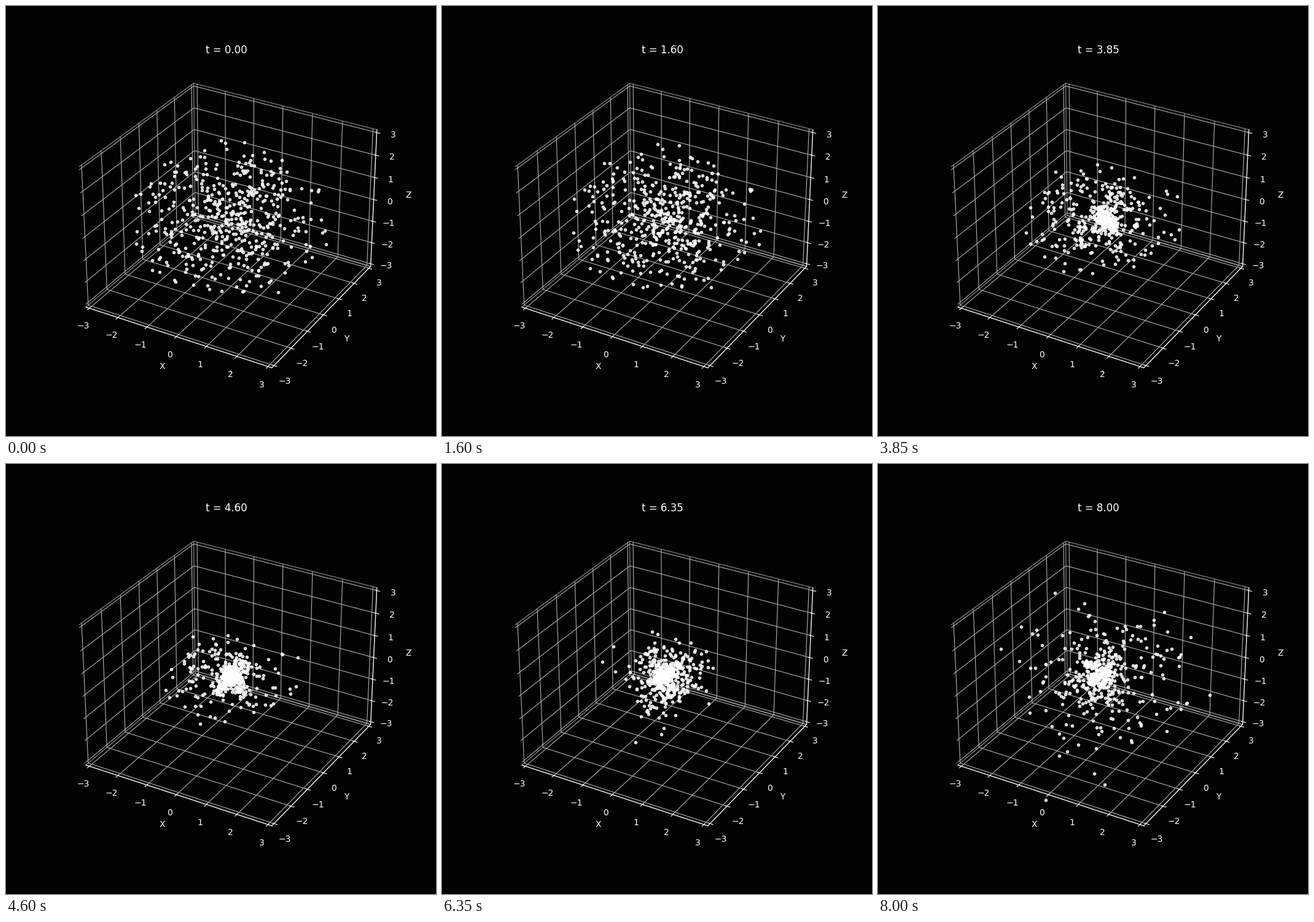
Write a matplotlib script that moves like this. It is 700x700 px and loops after 8.05 s.

```python
import numpy as np
import matplotlib.pyplot as plt
from matplotlib.animation import FuncAnimation

N = 500
FRAMES = 161
DT = 0.05
SOFT = 0.01
RADIUS = 2.95
LIM = 3.125  # +-3 plus the padding around the cube
BACK = "#030303"


def accel(pos):
    """Softened gravity of N equal masses with G = M = 1."""
    d = [p[None, :] - p[:, None] for p in pos]
    r2 = d[0] ** 2 + d[1] ** 2 + d[2] ** 2 + SOFT ** 2
    w = 1.0 / (N * r2 * np.sqrt(r2))
    return np.array([(w * c).sum(axis=1) for c in d])


def ball(rng):
    """Random points in a ball, slightly denser towards the middle."""
    v = rng.normal(size=(3, N))
    return v / np.linalg.norm(v, axis=0) * RADIUS * rng.uniform(size=N) ** 0.55


def simulate(seed=42):
    rng = np.random.default_rng(seed)
    pos = ball(rng)
    vel = rng.normal(0, 0.05, (3, N))
    acc = accel(pos)
    track = [pos]
    for _ in range(FRAMES - 1):
        vel = vel + 0.5 * DT * acc
        pos = pos + DT * vel
        acc = accel(pos)
        vel = vel + 0.5 * DT * acc
        track.append(pos)
    return track


track = simulate()

fig = plt.figure(figsize=(7, 7), dpi=100, facecolor=BACK)
ax = fig.add_subplot(111, projection="3d", facecolor=BACK)
ax.set(xlim=(-LIM, LIM), ylim=(-LIM, LIM), zlim=(-LIM, LIM))

for axis, name in zip((ax.xaxis, ax.yaxis, ax.zaxis), "XYZ"):
    axis.set_ticks(range(-3, 4))
    axis.set_label_text(name, color="white")
    axis.pane.fill = False
    axis.line.set_color("white")
    axis.set_tick_params(colors="white")

title = ax.set_title("t = 0.00", color="white", pad=5.3)
dots, = ax.plot(*track[0], "o", color="white", markersize=3, alpha=0.8)


def update(i):
    dots.set_data_3d(*track[i])
    title.set_text(f"t = {i * DT:.2f}")
    return dots, title


anim = FuncAnimation(fig, update, frames=FRAMES, interval=50, repeat=True, repeat_delay=0)
plt.show()
```
